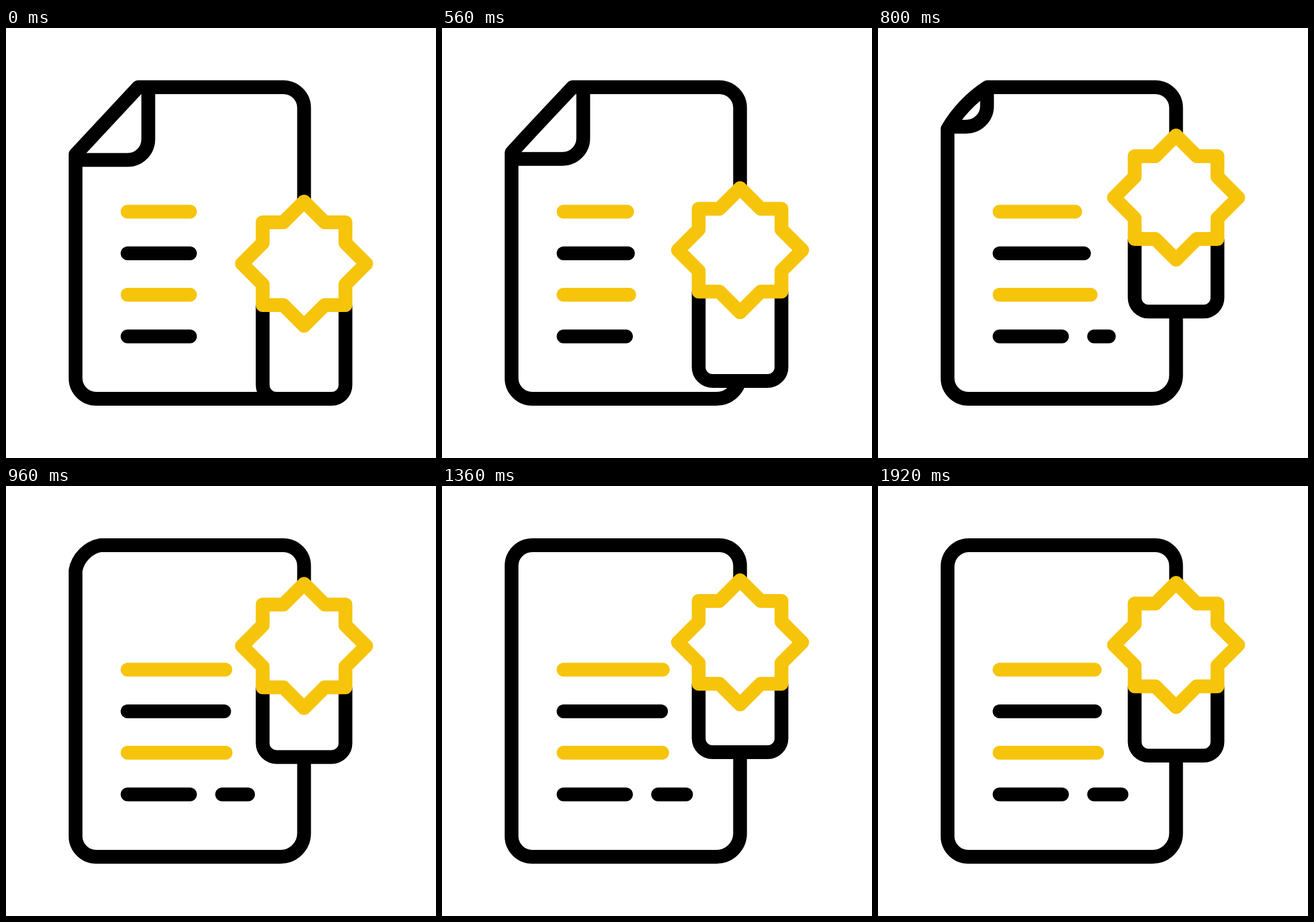
Write an HTML page that moves like this. It is 748 px wide and 748 px high and loops after 2 s.

```html
<!DOCTYPE html>
<html lang="en">
<head>
<meta charset="utf-8">
<title>Certificate</title>
<style>
  html, body { margin: 0; width: 100%; height: 100%; overflow: hidden; background: #fff; }
  svg { display: block; width: 100%; height: 100%; }
  .ink { stroke: #000; }
  .gold { stroke: #f6c40a; }
</style>
</head>
<body>
<svg viewBox="0 0 748 748" fill="none" stroke-width="24" stroke-linecap="round" stroke-linejoin="round">
  <clipPath id="inside"><path id="area"/></clipPath>
  <g clip-path="url(#inside)"><path id="fold" class="ink"/></g>
  <path id="page" class="ink"/>
  <path id="line1" class="gold"/>
  <path id="line2" class="ink"/>
  <path id="line3" class="gold"/>
  <path class="ink" d="M211.5 536.5H320"/>
  <path id="dash" class="ink"/>
  <path id="ribbon" class="ink" fill="#fff" stroke-linecap="butt"/>
  <path id="star" class="gold" fill="#fff"
    d="M0-108L36-72H72V-36L108 0L72 36V72H36L0 108L-36 72H-72V36L-108 0L-72-36V-72H-36Z"/>
</svg>
<script>
const LOOP = 2000, STEP = 80;
const LEFT = 121, TOP = 103, RIGHT = 518.5, BOTTOM = 645;
const FLAP = 126.5, ROUND = 36;
const el = id => document.getElementById(id);
const draw = (id, d) => el(id).setAttribute('d', d);
const mix = (a, b, k) => a + (b - a) * k;

// Cubic timing curve with handles (p1, 0) and (p2, 1), solved by bisection.
function ease(x, p1, p2) {
  if (x <= 0) return 0;
  if (x >= 1) return 1;
  let lo = 0, hi = 1, s;
  for (let i = 0; i < 30; i++) {
    s = (lo + hi) / 2;
    const u = 1 - s;
    if (3 * p1 * s * u * u + 3 * p2 * s * s * u + s * s * s < x) lo = s; else hi = s;
  }
  return s * s * (3 - 2 * s);
}

// Goes from 0 to 1 at `start` and sets out back towards 0 at `back`.
const track = (start, length, p1, p2, back) => t =>
  ease((t - start) / length, p1, p2) - ease((t - back) / length, p1, p2);

const badge = track(60, 1190, .867, .2, 1643);
const corner = track(440, 720, .545, .4, 1860);
const dash = track(600, 560, .54, .06, 1855);
const lines = [
  { id: 'line1', y: 319.5, grow: 64, at: track(400, 640, .91, .57, 1649) },
  { id: 'line2', y: 392, grow: 61, at: track(400, 640, .7, .5, 1758) },
  { id: 'line3', y: 464, grow: 63, at: track(400, 640, .58, .38, 1820) }
];

// The slanted cut and the rounded corner it turns into, from the page corner.
const cut = [[0, 117], [36, 78], [73, 39], [109, 0]];
const round = [[0, 36], [0, 16], [16, 0], [36, 0]];

function pagePath(k) {
  const [a, b, c, d] = cut.map(([x, y], i) =>
    `${LEFT + mix(x, round[i][0], k)} ${TOP + mix(y, round[i][1], k)}`);
  return `M${a}C${b} ${c} ${d}H${RIGHT - ROUND}a36 36 0 0 1 36 36V${BOTTOM - 41}` +
    `a41 41 0 0 1-41 41H${LEFT + ROUND}a36 36 0 0 1-36-36Z`;
}

function foldPath(k) {
  const size = FLAP * (1 - k ** 1.3), r = Math.min(ROUND, size);
  return `M${LEFT + size} ${TOP}v${size - r}a${r} ${r} 0 0 1 ${-r} ${r}H${LEFT}`;
}

function render(t) {
  const k = corner(t), page = pagePath(k);
  draw('page', page);
  draw('area', page);
  draw('fold', foldPath(k));

  for (const { id, y, grow, at } of lines) draw(id, `M211.5 ${y}H${320 + grow * at(t)}`);
  const length = 48.5 * dash(t);
  draw('dash', length > .01 ? `M376 536.5h${length}` : '');

  const rise = badge(t);
  const y = mix(410, 272, rise);
  const base = mix(BOTTOM, 463, rise);
  draw('ribbon', `M446.5 ${y + 72}V${base - 24}a24 24 0 0 0 24 24h96a24 24 0 0 0 24-24V${y + 72}`);
  el('star').setAttribute('transform', `translate(${RIGHT} ${y})`);
}

const begin = performance.now();
function tick() {
  const t = (performance.now() - begin) % LOOP;
  render(Math.floor(t / STEP) * STEP);
  requestAnimationFrame(tick);
}
tick();
</script>
</body>
</html>
```
